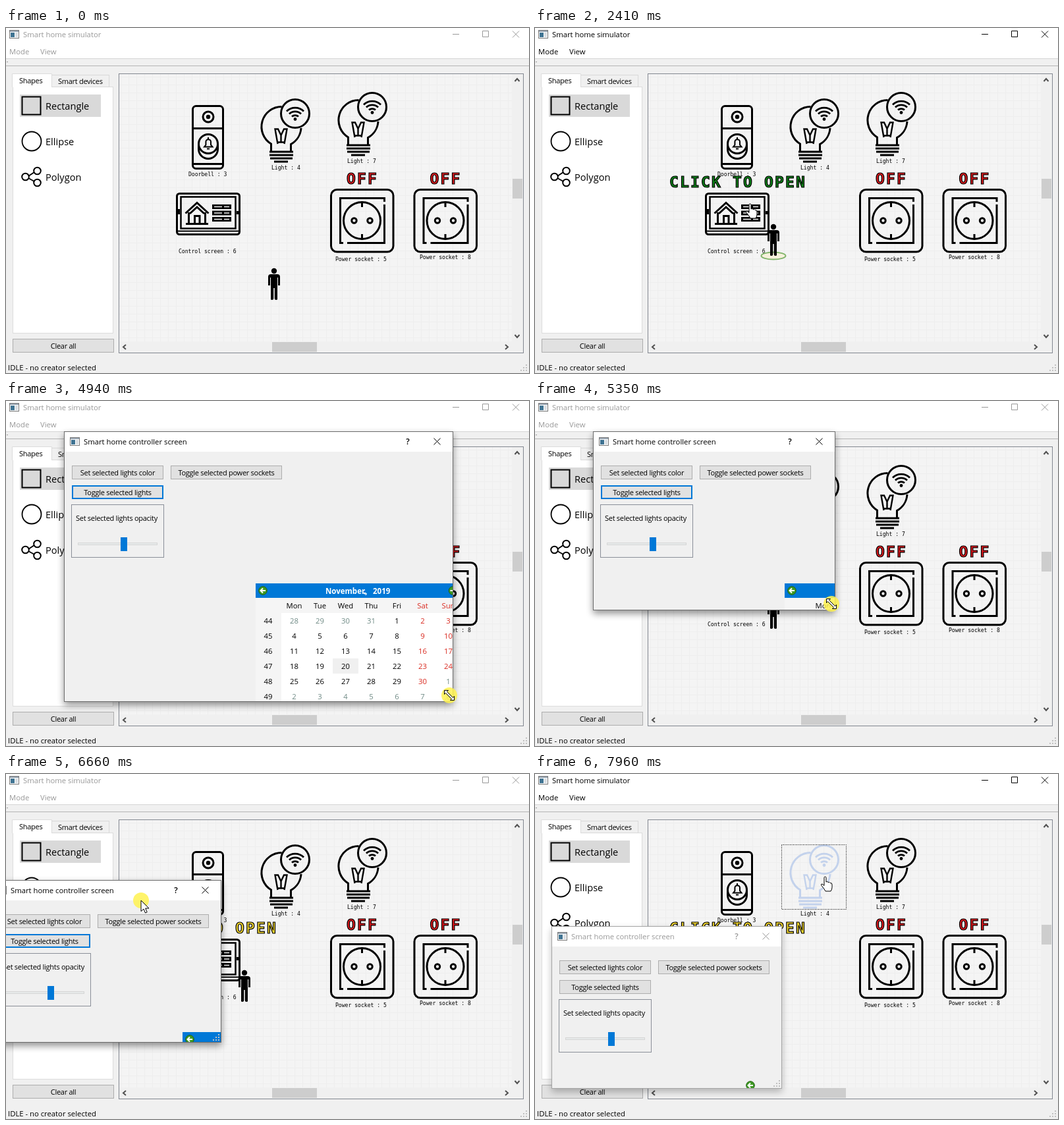
These frames come from a looping animation (794 by 524 pixels, 8 s). An HTML page:

```html
<!DOCTYPE html>
<html lang="en">
<head>
<meta charset="utf-8">
<title>Smart home simulator</title>
<style>
html, body { margin: 0; width: 100%; height: 100%; overflow: hidden; background: #f0f0f0; }
#stage { display: block; width: 794px; height: 524px; }
text { font: 11.3px "Open Sans", "Noto Sans", sans-serif; fill: #000; white-space: pre; }
.mid { text-anchor: middle; }
text.ui { font-size: 11px; letter-spacing: -.28px; }
text.item { font-size: 14.6px; }
text.tag { font: 8.1px "DejaVu Sans Mono", monospace; }
text.sign { font: bold 23px "DejaVu Sans Mono", monospace; letter-spacing: 2.15px; stroke: #000; stroke-width: 1.2px; }
text.month { font-weight: bold; font-size: 11.5px; fill: #fff; }
.win { --ink: #999; --accent: #adadad; --bar: none; }
.win.on { --ink: #000; --accent: #0078d7; --bar: #0078d7; }
text.ink { fill: var(--ink); }
.stroke { fill: none; stroke: var(--ink); stroke-width: 1; }
.line { fill: none; stroke: currentColor; stroke-width: 3; }
.btn { fill: #e1e1e1; stroke: #adadad; }
.btn.hot { fill: #e5f1fb; stroke: #0078d7; }
</style>
</head>
<body>
<svg id="stage" viewBox="0 0 794 524" xmlns="http://www.w3.org/2000/svg"></svg>
<script>
const LOOP = 8000;
const stage = document.getElementById('stage');

// Markup helpers
const text = (x, y, s, cls = '', extra = '') => `<text x="${x}" y="${y}" class="${cls}" ${extra}>${s}</text>`;
const rect = (x, y, w, h, fill, extra = '') => `<rect x="${x}" y="${y}" width="${w}" height="${h}" fill="${fill}" ${extra}/>`;
const box = (x, y, w, h, fill, stroke, extra = '') => rect(x + .5, y + .5, w - 1, h - 1, fill, `stroke="${stroke}" ${extra}`);
const path = (d, extra = 'class="line"') => `<path d="${d}" ${extra}/>`;
const circle = (x, y, r, extra = 'class="line"') => `<circle cx="${x}" cy="${y}" r="${r}" ${extra}/>`;
const group = (x, y, body, extra = '') => `<g transform="translate(${x} ${y})" ${extra}>${body}</g>`;
const button = (x, y, w, label, id = '') =>
  `<rect id="${id}" class="btn" x="${x + .5}" y="${y + .5}" width="${w - 1}" height="20"/>` +
  text(x + w / 2, y + 15, label, 'ui mid');
const grip = [[0, 0], [-4, 0], [-8, 0], [0, -4], [-4, -4], [0, -8]]
  .map(([x, y]) => rect(x - 5, y - 5, 2, 2, '#c0c0c0')).join('');
const appIcon = (x, y) => group(x, y, box(0, 0, 15, 13, '#fff', '#777') +
  rect(1, 1, 13, 2, '#9aa7b4') + rect(2, 4, 6, 7, '#3f7392') + rect(9, 4, 4, 7, '#d8dde2'));
const chevron = (x, y, turn) => `<path d="M-3.5 2L0 -2L3.5 2" transform="translate(${x} ${y}) rotate(${turn})" fill="none" stroke="#505050" stroke-width="2"/>`;

// Device icons
const doorbell = () => `<rect class="line" x="283.5" y="118.5" width="46" height="95" rx="5"/>` +
  path('M284 152.5H329M284 206.5H329') + circle(307, 135, 8) + circle(307, 135, 3.2, 'fill="#000"') +
  circle(307, 176, 14.5) + path('M292.5 177v7a14.5 14.5 0 0 0 29 0v-7') +
  path('M301 180.5h12.5l-2.5-3v-4.5a3.8 3.8 0 0 0-7.6 0v4.5zM305 183.5h4M307 166v3', 'fill="none" stroke="#000" stroke-width="2"');

const light = (id, x, y) => group(x, y,
  path('M418.5 119.500A30.500 30.500 0 0 0 402.500 176V188M432.500 188V176.500A30.500 30.500 0 0 0 448 152') +
  circle(439, 130, 21.5) +
  path('M400 188H436M400 193H436M401 198H435M407 203H428') +
  path('M412.500 176L408.500 153.500H413L417.500 163L422 153.500H426.500L422.500 176M412 173.500H423M417.500 163V173', 'fill="none" stroke="currentColor" stroke-width="2.4"') +
  path('M426 126.500a18.500 18.500 0 0 1 26 0M430 130.500a13 13 0 0 1 18 0M434 134.500a7.500 7.500 0 0 1 10 0', 'fill="none" stroke="currentColor" stroke-width="2.9"') +
  circle(439, 138.5, 2.4, 'fill="currentColor"'), `id="${id}"`);

const controlScreen = () => `<rect class="line" x="259.5" y="251.5" width="95" height="62" rx="4"/>` +
  box(265, 256, 84, 49, 'none', '#000', 'stroke-width="2.5"') +
  path('M260 308.5H354', 'stroke="#000" stroke-width="2"') + rect(350, 278, 5, 5, '#000') + rect(261, 275, 3, 8, '#000') +
  path('M272.5 281.5L290 265.5L307.5 281.5M277.5 280V297M302.5 280V297M273 297.5H307M286.5 297V285.5H294V297M279 282L290 272L301 282') +
  [268, 277.5, 287].map(y => rect(313, y, 29, 7, '#000') +
    path(`M316 ${y + 3.5}h12M331 ${y + 3.5}h8`, 'stroke="#f4f4f4" stroke-width="1.5"')).join('');

const socket = x => group(x, 0, `<rect class="line" x="493.5" y="245.5" width="94.500" height="94.500" rx="9"/>` +
  path('M574.5 264V258.5H507.5V326.5H512M518 326.5H574.5V268') + circle(540.5, 292.5, 28) +
  circle(528.5, 292.5, 3.7) + circle(552.5, 292.5, 3.7) + path('M540.5 264v8M540.5 313v8') +
  text(517, 237, 'OFF', 'sign', 'style="fill:#d8181c"'));

const person = () => circle(0, -44, 4.2, 'fill="#000"') +
  path('M-5 -39H5Q9 -39 9 -35V-22H6V-34H5V-1Q5 0 3 0Q.8 0 .8 -2V-18H-.8V-2Q-.8 0 -3 0Q-5 0 -5 -1V-34H-6V-22H-9V-35Q-9 -39 -5 -39Z', 'fill="#000"');

function mainWindow() {
  const tags = [[277, 225, 'Doorbell : 3'], [403, 215, 'Light : 4'], [518, 205, 'Light : 7'],
    [262, 342, 'Control screen : 6'], [500, 354, 'Power socket : 5'], [628, 351, 'Power socket : 8']];
  return rect(0, 0, 794, 524, '#f0f0f0') + rect(0, 0, 794, 46, '#fff') +
    rect(0, 46, 794, 1, '#d5d5d5') + rect(0, 57, 794, 1, '#b4b4b4') + rect(1, 51, 2, 1, '#999') +
    appIcon(5, 3) + text(26, 14, 'Smart home simulator', 'ink') +
    path('M678 9.5h10M723.5 4.5h9v9h-9zM769 4.5l10 10M779 4.5l-10 10', 'class="stroke"') +
    text(5, 40, 'Mode', 'ink') + text(52, 40, 'View', 'ink') +
    box(10, 89, 153, 375, '#fff', '#dcdcdc') + box(69, 71, 88, 19, '#f0f0f0', '#d9d9d9') +
    path('M9.5 90V69.5H69.5V90', 'fill="#fff" stroke="#dcdcdc"') +
    text(20, 84, 'Shapes', 'ui') + text(79, 85, 'Smart devices', 'ui') +
    rect(21, 101, 123, 34, '#d9d9d9') + box(24, 104, 29, 28, 'none', '#000', 'stroke-width="2"') +
    circle(39, 172, 14.5, 'fill="none" stroke="#000" stroke-width="1.8"') +
    path('M34 225L43 219M34 228L43 233', 'stroke="#000" stroke-width="2"') +
    [[29.5, 226], [47.5, 217], [47.5, 235]].map(([x, y]) => circle(x, y, 5.3, 'fill="none" stroke="#000" stroke-width="2"')).join('') +
    text(60, 124, 'Rectangle', 'item') + text(60, 178, 'Ellipse', 'item') + text(60, 232, 'Polygon', 'item') +
    button(10, 472, 154, 'Clear all') + text(3, 520, 'IDLE - no creator selected') + group(794, 524, grip) +
    box(171, 69, 615, 425, '#f0f0f0', '#828790') + rect(172, 70, 596, 406, '#f4f4f4') +
    rect(172, 70, 596, 406, 'url(#grid)') +
    rect(769, 229, 15, 30, '#cdcdcd') + rect(404, 477, 68, 15, '#cdcdcd') +
    chevron(776, 79, 0) + chevron(776, 468, 180) + chevron(180, 484.5, -90) + chevron(760, 484.5, 90) +
    doorbell() + light('light4', 0, 0) + light('light7', 117, -10) + controlScreen() + socket(0) + socket(126.5) +
    tags.map(t => text(...t, 'tag')).join('') +
    box(374, 107, 99, 99, 'none', '#000', 'id="selection" stroke-dasharray="1 1.5"') +
    text(204, 242, 'CLICK TO OPEN', 'sign', 'id="prompt"') +
    `<g id="walker"><ellipse id="ring" rx="18.5" ry="5.5" fill="#f6f1dc" stroke="#82b56c" stroke-width="2"/>${person()}</g>`;
}

function calendar() {
  const days = ['Mon', 'Tue', 'Wed', 'Thu', 'Fri', 'Sat', 'Sun'];
  const red = '#d92a20', faded = '#6f8a85';
  const arrow = (x, flip) => `<g transform="translate(${x} 11) scale(${flip} 1)">` +
    circle(0, 0, 6.3, 'fill="#3d9a22" stroke="#235f16"') + path('M4 0H-3M0 -3.5L-3.5 0L0 3.5', 'fill="none" stroke="#fff" stroke-width="2"') + '</g>';
  let out = rect(0, 22, 312, 161, '#f5f5f5') + rect(39, 45, 273, 138, '#fff') +
    rect(0, 0, 312, 22, 'var(--bar)') + arrow(11, 1) + arrow(299.5, -1) +
    text(106, 16, 'November,', 'month') + text(178, 16, '2019', 'month') + path('M163 14h5l-2.5 3z', 'fill="#fff"') +
    rect(117, 114, 39, 23, '#f0f0f0');
  days.forEach((d, i) => out += text(58.5 + 39 * i, 38, d, 'mid', i > 4 ? `style="fill:${red}"` : ''));
  for (let row = 0; row < 6; row++) {
    out += text(19, 61 + 23 * row, 44 + row, 'mid');
    for (let col = 0; col < 7; col++) {
      const n = row * 7 + col - 3;
      const inside = n > 0 && n < 31;
      const color = !inside ? faded : col > 4 ? red : '#000';
      out += text(58.5 + 39 * col, 61 + 23 * row, n < 1 ? n + 31 : n > 30 ? n - 30 : n, 'mid', `style="fill:${color}"`);
    }
  }
  return group(291, 231, out);
}

function dialog() {
  return `<rect id="shadow" fill="#000" filter="url(#blur)" y="5"/><svg id="pane" overflow="hidden">` +
    rect(0, 0, 700, 500, '#f0f0f0') + rect(0, 0, 700, 31, '#fff') +
    appIcon(9, 9) + text(30, 20, 'Smart home controller screen', 'ink') +
    `<g id="caption">${rect(-47, 1, 46, 30, '#e81123', 'id="closeHot"')}` +
    path('M-29.5 10.5l10 10M-19.5 10.5l-10 10', 'id="closeX" class="stroke"') +
    text(-69, 20, '?', 'ink mid', 'style="font-weight:600;font-size:12px"') + '</g>' +
    button(12, 52, 139, 'Set selected lights color') + button(162, 52, 169, 'Toggle selected power sockets', 'power') +
    button(12, 82, 139, 'Toggle selected lights') +
    rect(13, 83, 137, 19, 'none', 'stroke="var(--bar)" stroke-width="2"') +
    box(11, 111, 141, 81, 'none', '#8a8f98') + text(18, 136, 'Set selected lights opacity', 'ui') +
    box(21, 169, 121, 4, '#e7eaea', '#d6d6d6') + rect(86, 161, 10, 21, '#0078d7') +
    calendar() + `<g id="grip">${grip}</g></svg><rect id="edge" x=".5" y=".5" fill="none" stroke="#6b6b6b"/>`;
}

const cursors = `<g id="cursor">${circle(0, 0, 12, 'id="press" fill="#fff250" opacity=".85"')}` +
  path('M0 0V16.5L4 13L6.5 19L9.2 17.8L6.7 12H12Z', 'id="arrow" fill="#fff" stroke="#000"') +
  path('M0 1.5Q0 0 1.5 0T3 1.5V8Q5 6.5 6 8.5Q8 7.5 9 9.5Q12 9 12 12V16Q12 19 10 22H2Q0 18 -4 13.5Q-5.5 11 -3 11L0 13.5Z', 'id="hand" fill="#fff" stroke="#000"') +
  path('M-7.5 -7.5h6l-2 2L5.5 3.5l2-2v6h-6l2-2L-5.5 -3.5l-2 2z', 'id="resize" fill="#fff" stroke="#000"') + '</g>';

stage.innerHTML = `<defs><pattern id="grid" width="12" height="12" x="174" y="74" patternUnits="userSpaceOnUse">
  <path d="M0 .5H12M.5 0V12" stroke="#eeeeee"/></pattern>
  <filter id="blur" x="-20%" y="-20%" width="140%" height="140%"><feGaussianBlur stdDeviation="5.5"/></filter></defs>
  <g id="main" class="win">${mainWindow()}</g><g id="dialog" class="win">${dialog()}</g>${cursors}`;

const el = {};
stage.querySelectorAll('[id]').forEach(node => { if (node.id) el[node.id] = node; });

// Each key is [time, ...values]; values run linearly between keys.
function sample(keys, t) {
  if (t <= keys[0][0]) return keys[0].slice(1);
  for (let i = 1; i < keys.length; i++) {
    const a = keys[i - 1], b = keys[i];
    if (t <= b[0]) {
      const k = (t - a[0]) / (b[0] - a[0]);
      return a.slice(1).map((v, j) => v + (b[j + 1] - v) * k);
    }
  }
  return keys[keys.length - 1].slice(1);
}
const pointerKeys = [[40, 690, 461], [300, 645, 438], [500, 616, 425], [1990, 616, 425], [2400, 325, 267],
  [3400, 325, 267], [3680, 381, 96], [3820, 381, 96], [4150, 680, 66], [4300, 704, 100], [4610, 703, 452],
  [4700, 700, 464], [4890, 700, 464], [5350, 450, 308], [5540, 432, 282], [5820, 432, 277], [6010, 315, 66],
  [6150, 315, 65], [6340, 257, 63], [6500, 218, 112], [6660, 205, 192], [6750, 205, 250], [6890, 212, 250],
  [6940, 232, 250], [7080, 252, 250], [7300, 420, 190], [7500, 570, 138], [7690, 570, 138], [7850, 439, 156]];
const placeKeys = [[6150, 88, 46], [6340, 30, 43], [6500, -9, 92], [6660, -23, 161], [6750, -22, 231],
  [6890, -15, 231], [6940, 5, 231], [7080, 5, 231], [7120, 25, 231]];
const sizeKeys = [[4890, 618, 428], [5350, 368, 272], [5540, 350, 247]];
const walkKeys = [[1020, 407, 413], [1620, 362, 346]];

const OPEN = 2900, BACK = 7800;
const during = (t, ...spans) => spans.some(([a, b]) => t >= a && t < b);
const show = (node, on) => node.setAttribute('display', on ? 'inline' : 'none');
const set = (node, attrs) => { for (const k in attrs) node.setAttribute(k, attrs[k]); };

function drawDialog(t) {
  show(el.dialog, t >= OPEN);
  if (t < OPEN) return;
  const active = t < BACK;
  const [x, y] = sample(placeKeys, t).map(Math.round);
  const [w, h] = sample(sizeKeys, t).map(Math.round);
  const k = Math.min(1, (t - OPEN) / 180), grow = 1 - .1 * (1 - k) ** 2;
  el.dialog.classList.toggle('on', active);
  set(el.dialog, {
    opacity: .3 + .7 * k,
    transform: `translate(${x + w / 2 * (1 - grow)} ${y + h / 2 * (1 - grow)}) scale(${grow})`
  });
  set(el.pane, { width: w, height: h });
  set(el.edge, { width: w - 1, height: h - 1, stroke: active ? '#6b6b6b' : '#a5a5a5' });
  set(el.shadow, { width: w, height: h, opacity: active ? .42 : .25 });
  set(el.caption, { transform: `translate(${w} 0)` });
  set(el.grip, { transform: `translate(${w} ${h})` });
  const closing = during(t, [4125, 4270]);
  show(el.closeHot, closing);
  el.closeX.style.stroke = closing ? '#fff' : '';
  el.power.classList.toggle('hot', during(t, [3640, 3880]));
}

function drawPointer(t) {
  const [x, y] = sample(pointerKeys, t);
  show(el.cursor, t >= 40);
  set(el.cursor, { transform: `translate(${Math.round(x)} ${Math.round(y)})` });
  const hand = during(t, [2330, 3000], [7310, 7360], [7440, LOOP]);
  const resize = during(t, [4300, 5700]);
  show(el.hand, hand);
  show(el.resize, resize);
  show(el.arrow, !hand && !resize);
  show(el.press, during(t, [460, 540], [2880, 2960], [4890, 5540], [6150, 7080], [7790, 7900]));
}

function draw(t) {
  el.main.classList.toggle('on', during(t, [500, OPEN], [BACK, LOOP]));
  const [px, py] = sample(walkKeys, t);
  set(el.walker, { transform: `translate(${px} ${py})` });
  show(el.ring, during(t, [1020, OPEN]));
  show(el.prompt, t >= 1540);
  el.prompt.style.fill = during(t, [2330, OPEN]) ? '#0c8017' : '#f0d52c';
  set(el.light4, { color: during(t, [7310, 7360], [7760, LOOP]) ? '#c3d2ec' : '#000' });
  set(el.light7, { color: during(t, [7440, 7700]) ? '#c3d2ec' : '#000' });
  show(el.selection, t >= BACK);
  drawDialog(t);
  drawPointer(t);
}

const STEP = 10;
const start = performance.now();
function tick() {
  const t = (performance.now() - start) % LOOP;
  draw(Math.floor(t / STEP) * STEP);
  requestAnimationFrame(tick);
}
tick();
</script>
</body>
</html>
```
